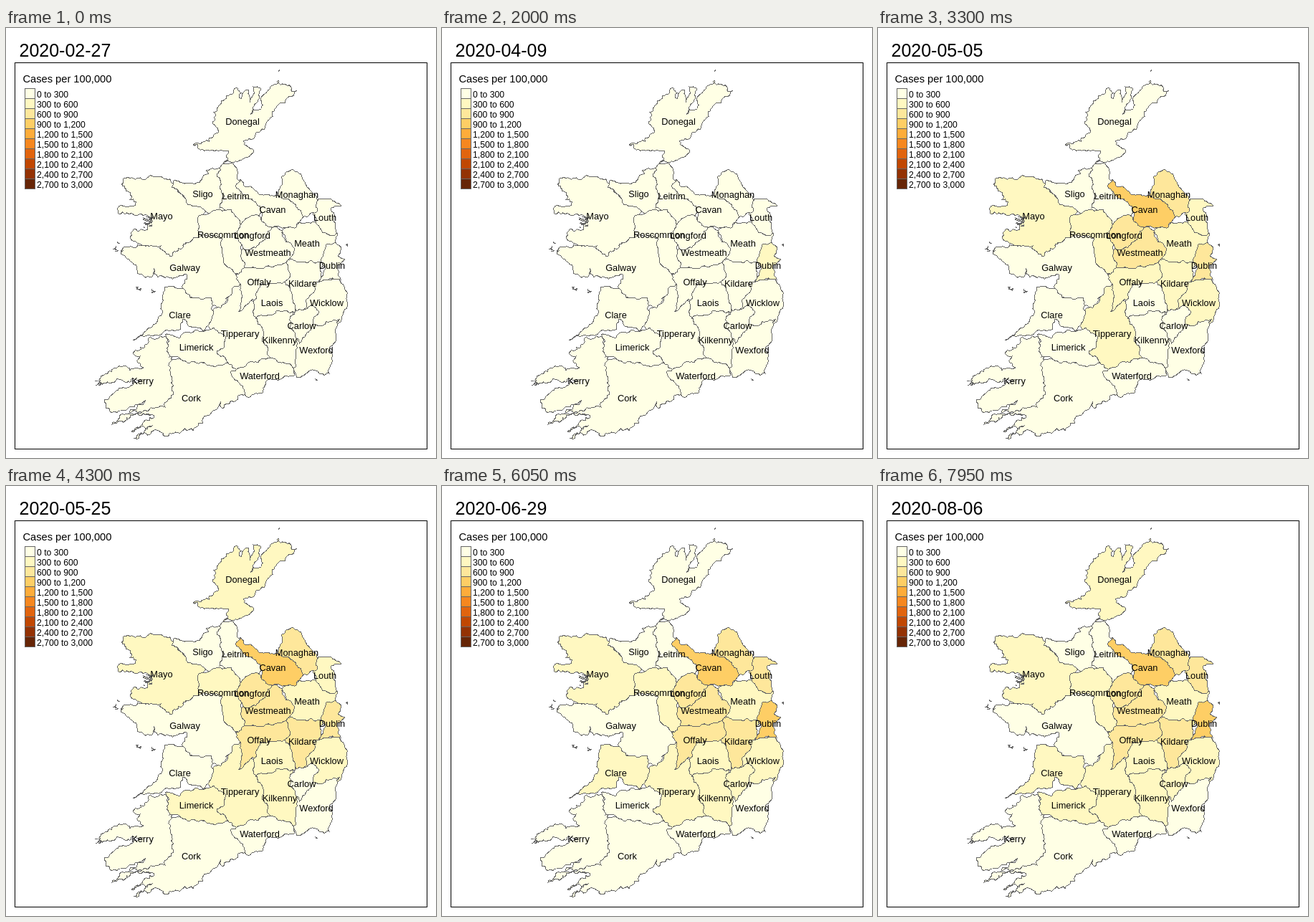
Animation, 600 px wide and 600 px high, one loop 8000 ms. Source, as an HTML page:

```html
<!DOCTYPE html>
<html lang="en">
<head>
<meta charset="utf-8">
<title>Cases per 100,000 by county</title>
<style>
  html, body { margin: 0; width: 100%; height: 100%; overflow: hidden; background: #fff; }
  svg { display: block; width: 100vw; height: 100vh; }
  text { font-family: "Liberation Sans", Arial, sans-serif; fill: #000; }
  #map path, #legend rect { fill: #FFFFE5; stroke: #666; stroke-width: 1; shape-rendering: crispEdges; }
  #labels text { font-size: 12.8px; text-anchor: middle; }
  #legend text { font-size: 12.2px; }
</style>
</head>
<body>
<svg viewBox="0 0 600 600">
  <rect x="12.5" y="48.5" width="575" height="539" fill="none" stroke="#000" shape-rendering="crispEdges"/>
  <text id="date" x="18.5" y="40" font-size="25"></text>
  <text x="23.5" y="76" font-size="14.67">Cases per 100,000</text>
  <g id="legend"></g>
  <g id="map"></g>
  <g id="labels"></g>
</svg>
<script>
const STEP = 50, LOOP = 8000, DAY = 864e5;
const SHADES = ['#FFFFE5', '#FFF8C1', '#FEE79B', '#FECE65', '#FEAC3A',
  '#F6871F', '#E1640E', '#C04702', '#933204', '#662506'];
const BORDER = 0.45, RAGGED = 0.8;
const byId = id => document.getElementById(id);
const counties = [];

function add(parent, tag, attrs, text = '') {
  const el = document.createElementNS('http://www.w3.org/2000/svg', tag);
  for (const key in attrs) el.setAttribute(key, attrs[key]);
  el.textContent = text;
  return byId(parent).appendChild(el);
}

let seed = 7;
const random = () => (seed = seed * 16807 % 2147483647) / 2147483647 - 0.5;

// Fractal midpoint displacement turns a few key points into a natural line.
function wiggle([ax, ay], [bx, by], amount) {
  const dx = bx - ax, dy = by - ay, length = Math.hypot(dx, dy);
  if (length < 4) return [[bx, by]];
  const shift = random() * Math.min(amount, 6 / length);
  const mid = [(ax + bx) / 2 - dy * shift, (ay + by) / 2 + dx * shift];
  return [...wiggle(ax === mid[0] ? [ax, ay] : [ax, ay], mid, amount), ...wiggle(mid, [bx, by], amount)];
}

const closed = points => 'M' + points.map(p => p.map(v => v.toFixed(1))).join('L') + 'Z';

function outline(keyPoints, amount) {
  const points = keyPoints.split(' ').map(p => p.split(',').map(Number));
  return closed(points.flatMap((p, i) => wiggle(p, points[(i + 1) % points.length], amount)));
}

// rises lists the steps at which the class goes up, a negative step takes it down.
// Later counties overlap the edges of earlier ones.
function county(name, x, y, rises, keyPoints, amount = BORDER) {
  const shape = add('map', 'path', { d: outline(keyPoints, amount) });
  add('labels', 'text', { x, y: y + 4 }, name);
  counties.push({ shape, rises });
}

function islets(x, y, spread, count) {
  for (let i = 0; i < count; i++) {
    const cx = x + 2 * spread * random(), cy = y + 2 * spread * random();
    const corner = () => [cx + 5 * random(), cy + 4 * random()];
    add('map', 'path', { d: closed([corner(), corner(), corner()]) });
  }
}

county('Galway', 249.5, 335, [],
  '190,303 168,305 160,312 176,327 183,338 192,346 204,347 206,335 212,348 244,345 253,346 245,361 ' +
  '250,372 284,386 300,392 317,374 332,352 312,325 300,287 272,284 240,308 226,303', RAGGED);
county('Mayo', 217, 263, [47],
  '231,216 214,207 183,209 163,213 170,228 172,240 182,243 155,252 157,259 180,262 202,266 198,278 178,281 ' +
  '177,297 190,303 216,304 232,318 251,299 274,290 273,263 282,257 258,241 240,224', RAGGED);
county('Sligo', 274.5, 232, [],
  '231,222 235,212 246,216 270,216 283,203 279,199 303,192 304,214 308,236 302,260 282,258 271,249 258,247 249,236');
county('Donegal', 330, 131, [78, -100, 145],
  '303,189 311,172 288,170 261,163 289,152 296,140 288,131 289,117 300,102 318,90 323,84 328,99 334,87 339,87 ' +
  '341,104 345,82 355,84 351,103 341,121 356,113 361,92 380,73 406,87 374,116 360,142 331,158 345,170 338,180 318,188',
  RAGGED);
county('Leitrim', 320.5, 235, [],
  '303,189 318,191 330,224 357,246 352,266 328,279 312,258 298,251 305,234 294,206');
county('Roscommon', 303, 289, [58],
  '283,259 314,253 330,276 328,298 336,327 328,346 320,343 304,322 302,294 270,288 268,264');
county('Tipperary', 326.5, 427, [60],
  '316,363 327,357 337,380 350,388 366,430 371,463 335,477 308,481 290,453 302,434 280,414 290,392 307,384');
county('Clare', 242.5, 401, [92],
  '222,361 250,366 257,376 287,377 290,398 276,423 253,413 247,406 244,420 208,428 177,436 204,417 218,394 219,372');
county('Kerry', 190.5, 493, [],
  '222,430 198,434 193,446 177,453 187,458 184,467 192,474 163,472 132,488 125,499 163,492 190,491 152,508 ' +
  '138,518 140,531 155,537 195,519 172,537 205,538 228,530 238,508 236,476 229,453', RAGGED);
county('Cork', 258.5, 517, [],
  '230,465 253,460 303,464 315,470 330,486 338,508 309,524 302,531 300,521 280,541 265,557 245,563 223,569 ' +
  '210,561 178,573 204,555 175,563 206,544 198,538 148,553 172,539 222,529 234,508 231,490', RAGGED);
county('Limerick', 265.5, 446, [74, -105, 130],
  '222,428 243,432 267,421 290,418 306,430 303,447 294,451 309,467 283,470 245,463 228,459');
county('Wicklow', 447.5, 384, [49],
  '434,350 466,350 476,384 467,410 440,420 420,412 413,382 422,352');
county('Wexford', 433, 450, [],
  '466,406 461,430 451,450 456,464 451,482 424,478 406,488 399,474 402,440 424,410 441,416 456,408');
county('Meath', 420, 301, [53],
  '402,274 437,265 441,277 463,286 455,306 447,318 441,330 410,331 391,322 391,302 384,284');
county('Laois', 371, 384, [69],
  '346,362 354,354 388,350 403,368 408,397 369,406 349,406 344,396');
county('Kilkenny', 382, 436, [70],
  '349,404 377,395 400,396 407,435 404,458 401,477 370,468 361,442 358,420');
county('Waterford', 354, 486, [],
  '336,469 367,461 401,475 402,485 362,495 357,510 335,514 326,496 314,479');
county('Carlow', 412.5, 416, [98],
  '404,393 417,393 429,388 436,395 429,413 409,441 397,419 396,403');
county('Kildare', 414, 357, [48, 72],
  '392,324 410,327 442,325 440,352 428,355 431,362 420,378 415,394 405,395 397,362 389,351');
county('Dublin', 455, 332, [38, 53, 97],
  '447,302 460,299 468,308 463,318 473,323 462,331 467,351 436,353 446,336 439,326 443,315');
county('Louth', 445, 265, [48, 107],
  '428,260 434,240 452,238 468,248 453,252 460,281 459,289 442,286');
county('Monaghan', 406, 233, [53, 60],
  '386,217 385,207 400,197 413,208 434,236 435,254 414,264 400,250 378,238');
county('Westmeath', 365.5, 314, [44, 61],
  '369,274 386,283 388,293 403,308 394,323 391,332 351,338 333,335 327,318 330,304 350,298');
county('Cavan', 372, 254, [46, 53, 58],
  '320,221 327,211 334,222 355,233 392,238 405,250 414,262 405,278 360,280 355,254 343,238 326,227');
county('Longford', 343.5, 290, [52, 61],
  '328,274 349,260 357,270 371,278 352,303 335,310 320,289');
county('Offaly', 353, 355, [56, 77],
  '333,334 362,333 391,327 397,343 389,354 354,359 348,379 324,396 330,373 320,343');

islets(198, 271, 6, 22);
islets(186, 362, 4, 4);
islets(203, 370, 4, 4);
islets(157, 306, 6, 5);
islets(130, 497, 5, 4);
islets(431, 490, 1, 1);
islets(475, 303, 1, 1);
islets(381, 60, 1, 1);

SHADES.forEach((shade, i) => {
  const bound = n => (n * 300).toLocaleString('en-US');
  add('legend', 'rect', { x: 26.5, y: 84.5 + 14 * i, width: 14, height: 14 }).style.fill = shade;
  add('legend', 'text', { x: 43, y: 96.5 + 14 * i }, `${bound(i)} to ${bound(i + 1)}`);
});

// No reports exist for 1 and 2 March.
function dateAt(step) {
  const day = step < 3 ? step : step + 2;
  return new Date(Date.UTC(2020, 1, 27) + day * DAY).toISOString().slice(0, 10);
}

let shown = -1;
function draw() {
  const step = Math.floor(performance.now() % LOOP / STEP);
  if (step !== shown) {
    shown = step;
    byId('date').textContent = dateAt(step);
    for (const { shape, rises } of counties) {
      const level = rises.reduce((sum, at) => sum + (step >= Math.abs(at) ? Math.sign(at) : 0), 0);
      shape.style.fill = SHADES[level];
    }
  }
  requestAnimationFrame(draw);
}
draw();
</script>
</body>
</html>
```
